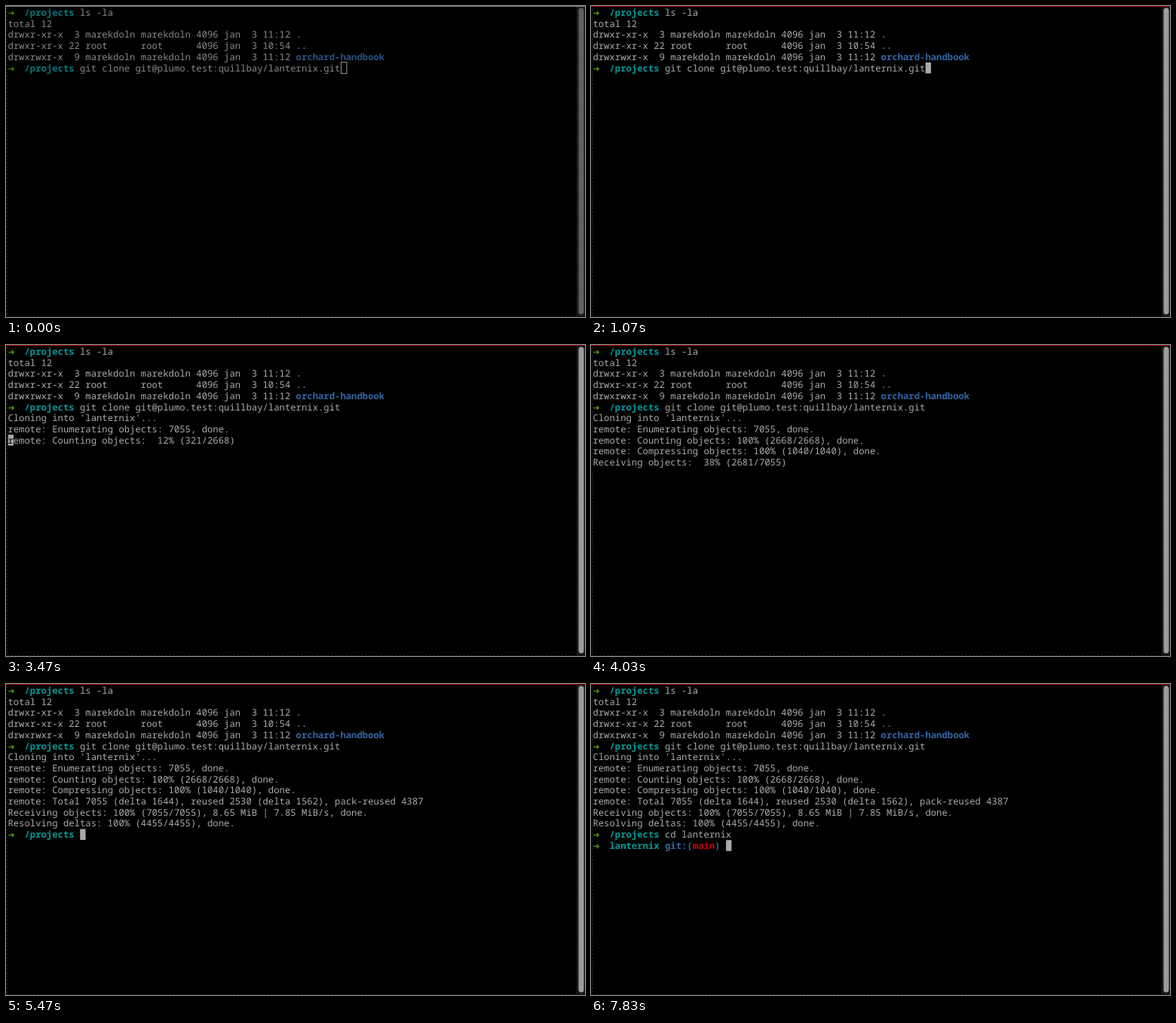
Animation of 768x413 px, one loop 8000 ms. Source, as an HTML page:

```html
<!DOCTYPE html>
<html lang="en">
<head>
<meta charset="utf-8">
<title>Terminal clone</title>
<style>
  html, body { margin: 0; width: 100%; height: 100%; overflow: hidden; background: #000; }
  svg { display: block; width: 768px; height: 413px; }
  text {
    font: 12.25px "Noto Sans Mono", "DejaVu Sans Mono", monospace;
    text-rendering: geometricPrecision;
    white-space: pre;
    fill: #aaa;
  }
  text.arrow { font: 11px "DejaVu Sans", sans-serif; fill: #4e9a06; }
  text.path, text.dir, text.git, text.branch { font-weight: 700; }
  text.path { fill: #06989a; }
  text.dir, text.git { fill: #3465a4; }
  text.branch { fill: #c00; }
  text.under { fill: #000; }
</style>
</head>
<body>
<svg viewBox="0 0 768 413">
  <rect width="768" height="413"/>
  <path d="M1.5 2V412M1 412.5H757" stroke="#222230" stroke-dasharray="3 2"/>
  <rect x="757" y="1" width="11" height="412" fill="#16161a"/>
  <path d="M757.5 1V413" stroke="#2c2c38" stroke-dasharray="2 2"/>
  <rect id="thumb" x="759.5" y="2.5" width="7" height="407" rx="3.5"/>
  <path id="edge" d="M0 .5H768"/>
  <g id="screen"></g>
</svg>
<script>
const LOOP = 8000, CELL = 7.35, ROW = 14.7, LEFT = 2.4, TOP = 1.5;
const FOCUS = 870, ENTER = 1670;
const REPO = 'lanternix';
const byId = id => document.getElementById(id);
const edge = byId('edge'), thumb = byId('thumb'), screenLayer = byId('screen');

const clamp = v => Math.min(1, Math.max(0, v));
const span = (t, a, b) => clamp((t - a) / (b - a));
const latest = (steps, t) => steps.filter(s => s[0] <= t).pop()?.[1];

// A line is a list of [text, class] runs.
const plain = s => [[s, '']];
const prompt = (dir, rest = '') =>
  [['➜', 'arrow'], ['  ', ''], [dir, 'path'], [' ' + rest, '']];
const entry = (head, name) => [[head + ' ', ''], [name, 'dir']];

const listing = [
  prompt('/projects', 'ls -la'),
  plain('total 12'),
  entry('drwxr-xr-x  3 marekdoln marekdoln 4096 jan  3 11:12', '.'),
  entry('drwxr-xr-x 22 root      root      4096 jan  3 10:54', '..'),
  entry('drwxrwxr-x  9 marekdoln marekdoln 4096 jan  3 11:12', 'orchard-handbook'),
  prompt('/projects', `git clone git@plumo.test:quillbay/${REPO}.git`)
];

function progress(label, total, part, rate = '') {
  const pct = Math.floor(part * 100 + 1e-6);
  const count = Math.ceil(pct * total / 100);
  return plain(`${label}: ${String(pct).padStart(3)}% (${count}/${total})${rate}` +
    (pct === 100 ? ', done.' : ''));
}

const rates = [[0, ''], [4130, ', 3.52 MiB | 6.98 MiB/s'],
  [4630, ', 7.39 MiB | 7.31 MiB/s'], [4700, ', 8.65 MiB | 7.85 MiB/s']];
const typed = [[0, ''], [5600, 'c'], [5770, 'cd'], [5870, 'cd '], [5970, 'cd l'],
  [6130, 'cd la'], [6270, 'cd lan'], [6430, `cd ${REPO}/`], [6860, `cd ${REPO}`]];

// Lines on screen, and the cursor as [row, column].
function terminal(t) {
  const lines = [...listing];
  if (t < ENTER) return { lines, cursor: [5, 60] };
  if (t < 1700) return { lines, cursor: [6, 0] };
  lines.push(plain(`Cloning into '${REPO}'...`));
  if (t < 3470) return { lines, cursor: [7, 0] };

  lines.push(plain('remote: Enumerating objects: 7055, done.'));
  lines.push(progress('remote: Counting objects', 2668, .12 + .88 * span(t, 3499, 3535)));
  if (t >= 3535) lines.push(progress('remote: Compressing objects', 1040, span(t, 3530, 3610)));
  if (t >= 3620) {
    const part = t < 4630 ? .95 * span(t, 3620, 4630) : .95 + .05 * span(t, 4665, 4700);
    if (t >= 4700)
      lines.push(plain('remote: Total 7055 (delta 1644), reused 2530 (delta 1562), pack-reused 4387'));
    lines.push(progress('Receiving objects', 7055, part, latest(rates, t)));
  }
  if (t >= 4730) lines.push(progress('Resolving deltas', 4455, span(t, 4730, 5070)));
  if (t < 5070) return { lines, cursor: [lines.length - 1, 0] };
  if (t < 5150) return { lines, cursor: [13, 0] };

  const command = latest(typed, t);
  lines.push(prompt('/projects', command));
  if (t < 6860) return { lines, cursor: [13, 13 + command.length] };
  if (t < 6960) return { lines, cursor: [14, 0] };
  lines.push([...prompt(REPO), ['git:(', 'git'], ['main', 'branch'], [')', 'git']]);
  return { lines, cursor: [14, 24] };
}

function cursorOn(t) {
  if (t >= 2300 && t < 5600) return Math.floor((t - 2300) / 600) % 2 === 1;
  return t < 7500 || t >= 7800;
}

const escape = s => s.replace(/&/g, '&amp;').replace(/</g, '&lt;');
const glyphs = (row, col, s, cls) =>
  `<text class="${cls}" x="${(LEFT + col * CELL).toFixed(2)}" y="${(TOP + row * ROW + 11.5).toFixed(2)}">${escape(s)}</text>`;

function drawLine(runs, row) {
  let col = 0, out = '';
  for (const [s, cls] of runs) {
    const lead = s.length - s.trimStart().length;
    if (s.trim()) out += glyphs(row, col + lead, s.trimStart(), cls);
    col += s.length;
  }
  return out;
}

function drawCursor(lines, [row, col], focused) {
  const x = LEFT + col * CELL + .3, y = TOP + row * ROW;
  if (!focused)
    return `<rect x="${x + .8}" y="${y - .5}" width="7.5" height="15" fill="none" stroke="#bbb"/>`;
  const under = (lines[row] || []).map(run => run[0]).join('')[col];
  return `<rect x="${x}" y="${y}" width="7.3" height="14.5" fill="#aaa"/>` +
    (under ? glyphs(row, col, under, 'under') : '');
}

let shown = '';
function draw() {
  const t = performance.now() % LOOP;
  const { lines, cursor } = terminal(t);
  const focused = t >= FOCUS;
  const markup = lines.map(drawLine).join('') +
    (cursorOn(t) ? drawCursor(lines, cursor, focused) : '');
  if (markup !== shown) screenLayer.innerHTML = shown = markup;
  // An unfocused window is drawn dimmer, with a grey title edge.
  screenLayer.setAttribute('opacity', focused ? 1 : .8);
  edge.setAttribute('stroke', focused ? '#a80003' : '#8c8c8c');
  thumb.setAttribute('fill', focused ? '#9c9c9c' : '#606060');
  requestAnimationFrame(draw);
}
draw();
</script>
</body>
</html>
```
